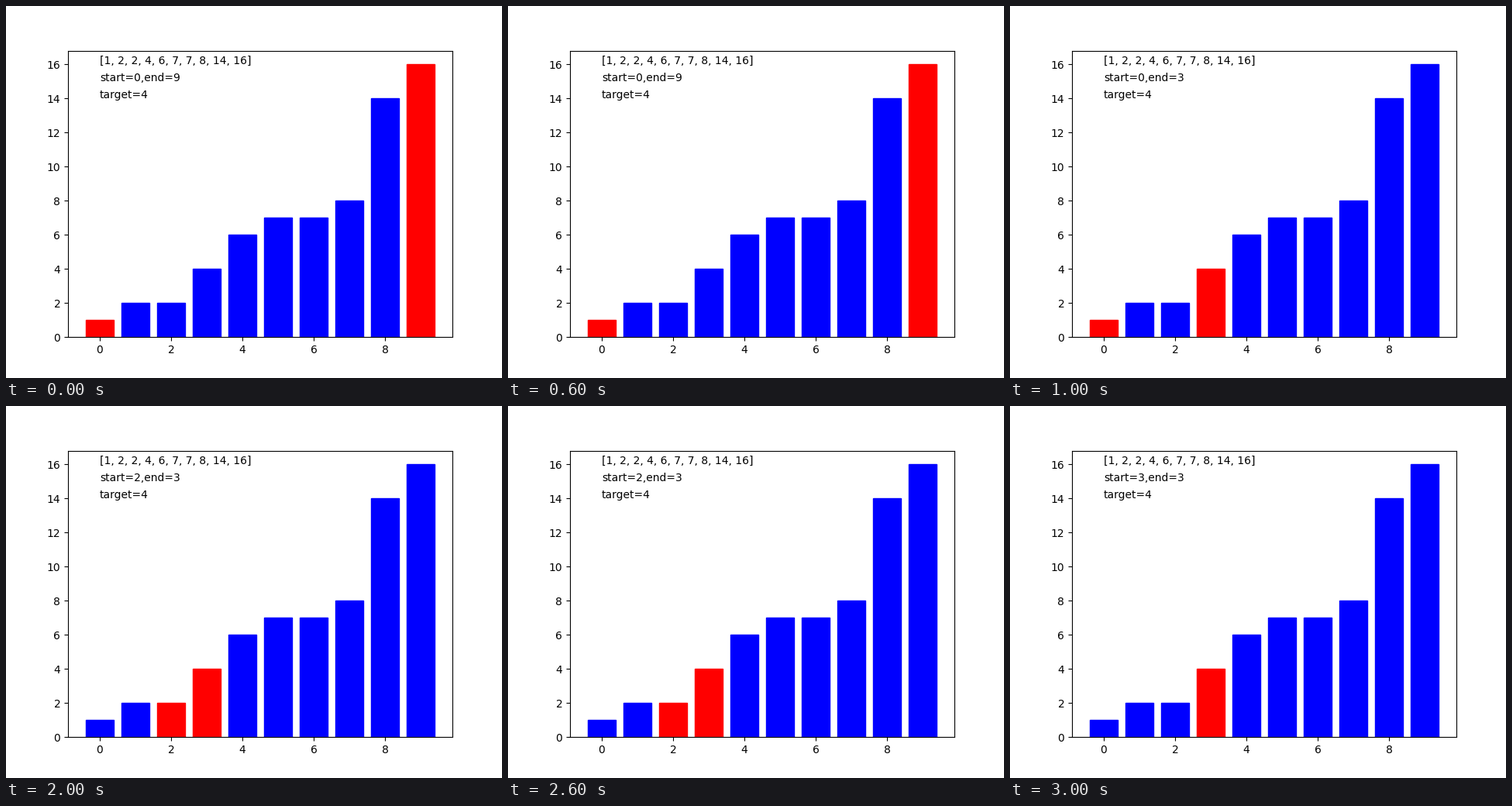
A matplotlib script that plays this animation: 640 by 480 pixels, repeating every 4 s.

```python
import matplotlib.pyplot as plt
from matplotlib.animation import FuncAnimation

VALUES = [1, 2, 2, 4, 6, 7, 7, 8, 14, 16]
TARGET = 4
STEP_MS = 1000


def search_steps(values, target):
    """List the (start, end) bounds visited by a binary search."""
    start, end = 0, len(values) - 1
    steps = []
    while start <= end:
        steps.append((start, end))
        mid = (start + end) // 2
        if values[mid] == target:
            break
        if values[mid] < target:
            start = mid + 1
        else:
            end = mid - 1
    return steps


steps = search_steps(VALUES, TARGET)

fig, ax = plt.subplots(figsize=(6.4, 4.8), dpi=100)
bars = ax.bar(range(len(VALUES)), VALUES, color="blue")
ax.text(0, 16, str(VALUES))
bounds_label = ax.text(0, 15, "")
ax.text(0, 14, f"target={TARGET}")


def draw_step(index):
    start, end = steps[index]
    for position, bar in enumerate(bars):
        bar.set_color("red" if position in (start, end) else "blue")
    bounds_label.set_text(f"start={start},end={end}")
    return [*bars, bounds_label]


animation = FuncAnimation(
    fig, draw_step, frames=len(steps), interval=STEP_MS,
    repeat=True, repeat_delay=0,
)

plt.show()
```
